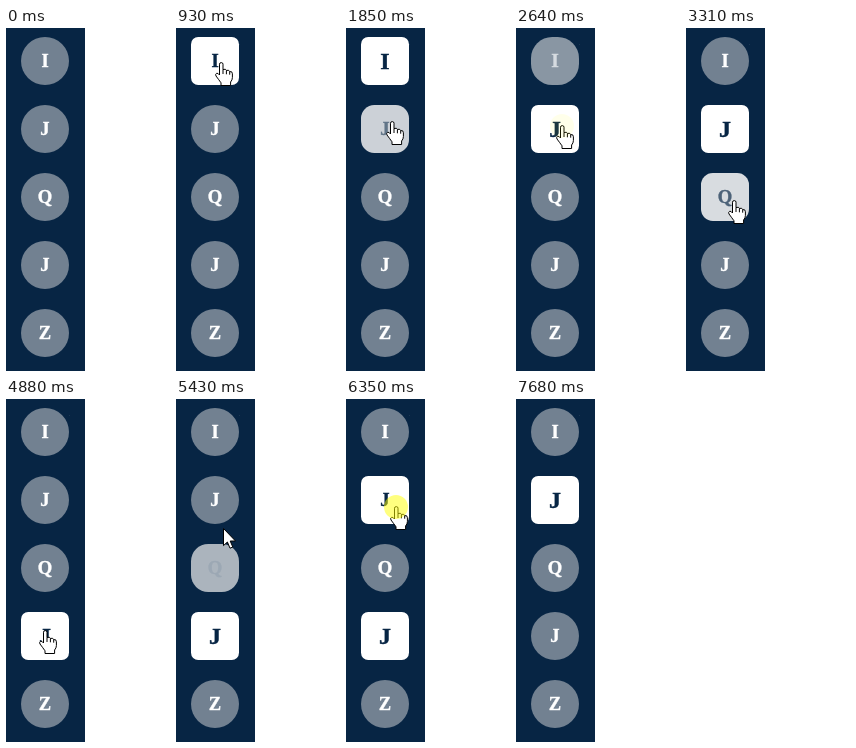
Write an HTML page that moves like this. It is 164 by 343 pixels and loops after 8.08 s.

```html
<!DOCTYPE html>
<html lang="en">
<head>
<meta charset="utf-8">
<title>Sidebar buttons</title>
<style>
  html, body { margin: 0; width: 100%; height: 100%; overflow: hidden; background: #fff; }
  svg { display: block; width: 164px; height: 343px; }
  text { font-family: "Liberation Serif", "Times New Roman", serif; font-weight: 700; text-anchor: middle; stroke-width: .4; }
  .cursor { fill: #fff; stroke: #000; stroke-width: 1; stroke-linejoin: round; }
</style>
</head>
<body>
<svg id="stage" viewBox="0 0 164 343">
  <rect width="79" height="343" fill="#072544"/>
  <g id="buttons"></g>
  <g id="cursor" class="cursor">
    <path id="arrow" d="M.5 .5V17.6L4.4 14 7 20.2 9.8 19 7.2 13H12.5Z"/>
    <g id="hand">
      <path d="M-1.5 1.2Q-1.5-.4 .3-.4Q2-.4 2 1.2V6.5Q5 5.6 5.4 7.4Q8.2 6.6 8.7 8.6Q11.4 8 11.4 10.8V14.5Q11.4 17 9.6 19V22.5H0V19.8Q-2 17-5 13Q-6 11.2-4.4 10.3Q-3 9.8-1.5 12Z"/>
      <path fill="none" d="M2 6.5V11M5.4 7.4V11.3M8.7 8.6V11.7"/>
    </g>
  </g>
  <circle id="click" r="12" fill="#ff0"/>
</svg>
<script>
const LOOP = 8080, CAPTURE = 132.4, FADE = 350;
const TOP = 9, SIZE = 48, PITCH = 68, LEFT = 15;
const GREY = [114, 129, 145], WHITE = [255, 255, 255], NAVY = [7, 37, 68];
const $ = id => document.getElementById(id);

// Each hover span is [enter, leave]
const buttons = [
  { letter: 'I', hovers: [[560, 1590]] },
  { letter: 'J', hovers: [[1715, 3100], [5470, Infinity]] },
  { letter: 'Q', hovers: [[3145, 3500], [5050, 5300]] },
  { letter: 'J', hovers: [[3500, 5050]] },
  { letter: 'Z', hovers: [] }
];

const clicks = [
  { button: 0, down: 1060, up: 1150 },
  { button: 1, down: 2380, up: 2440 },
  { button: 3, down: 4100, up: 4190 },
  { button: 1, down: 6350, up: 6650 }
];

// Pointer key points: time, x, y
const path = [
  [260, 151, 264], [528, 77, 58], [800, 45, 35], [1450, 45, 35], [1850, 46, 94], [2100, 46, 98],
  [2900, 46, 98], [3310, 48, 173], [3570, 39, 231.5], [4770, 39, 231.5], [5020, 41, 194],
  [5428, 47, 129], [5700, 50, 108]
];

const clamp = v => Math.min(1, Math.max(0, v));
const ramp = (t, start) => 1 - (1 - clamp((t - start) / FADE)) ** 2;
const pulse = (t, on, off) => ramp(t, on) * (1 - ramp(t, off));
const mix = (a, b, k) => `rgb(${a.map((v, i) => Math.round(v + (b[i] - v) * k))})`;

function set(el, attrs) {
  for (const name in attrs) el.setAttribute(name, attrs[name]);
}

function add(tag, attrs) {
  const el = document.createElementNS('http://www.w3.org/2000/svg', tag);
  set(el, attrs);
  return $('buttons').appendChild(el);
}

buttons.forEach((b, i) => {
  const y = TOP + PITCH * i;
  b.mid = y + SIZE / 2;
  b.box = add('rect', { x: LEFT, y, width: SIZE, height: SIZE });
  b.text = add('text', { x: LEFT + SIZE / 2 });
  b.text.textContent = b.letter;
});

// A button stays selected until the next click is released
function selection(index, t) {
  return Math.max(0, ...clicks.map((c, i) =>
    c.button === index ? pulse(t, c.up, clicks[i + 1]?.up ?? Infinity) : 0));
}

function pointer(t) {
  const next = path.findIndex(p => p[0] > t);
  if (next < 1) return path.at(next).slice(1);
  const [t0, x0, y0] = path[next - 1], [t1, x1, y1] = path[next];
  const k = (t - t0) / (t1 - t0);
  return [x0 + (x1 - x0) * k, y0 + (y1 - y0) * k];
}

function drawButton(b, index, t) {
  const selected = selection(index, t);
  const lit = Math.max(selected, ...b.hovers.map(([on, off]) => pulse(t, on, off)));
  const size = 18.6 + 5.4 * selected;
  const ink = mix(WHITE, NAVY, lit);
  set(b.box, { rx: SIZE * (.5 - .35 * lit), fill: mix(GREY, WHITE, lit) });
  set(b.text, { y: b.mid + size * .33, 'font-size': size, fill: ink, stroke: ink });
}

function drawPointer(t) {
  const [x, y] = pointer(t);
  const over = x >= LEFT && x < LEFT + SIZE && (y - TOP) % PITCH < SIZE;
  set($('cursor'), {
    transform: `translate(${Math.round(x)} ${Math.round(y)})`,
    opacity: t < path[0][0] ? 0 : 1 - ramp(t, 7330)
  });
  $('hand').style.display = over ? '' : 'none';
  $('arrow').style.display = over ? 'none' : '';
  const last = clicks.findLast(c => c.down <= t);
  set($('click'), { cx: x, cy: y, opacity: last ? .5 * (1 - ramp(t, last.up)) : 0 });
}

function draw(time) {
  const t = Math.floor((time + 10) / CAPTURE) * CAPTURE;
  buttons.forEach((b, i) => drawButton(b, i, t));
  drawPointer(t);
}

const start = performance.now();
function tick() {
  draw((performance.now() - start) % LOOP);
  requestAnimationFrame(tick);
}
tick();
</script>
</body>
</html>
```
